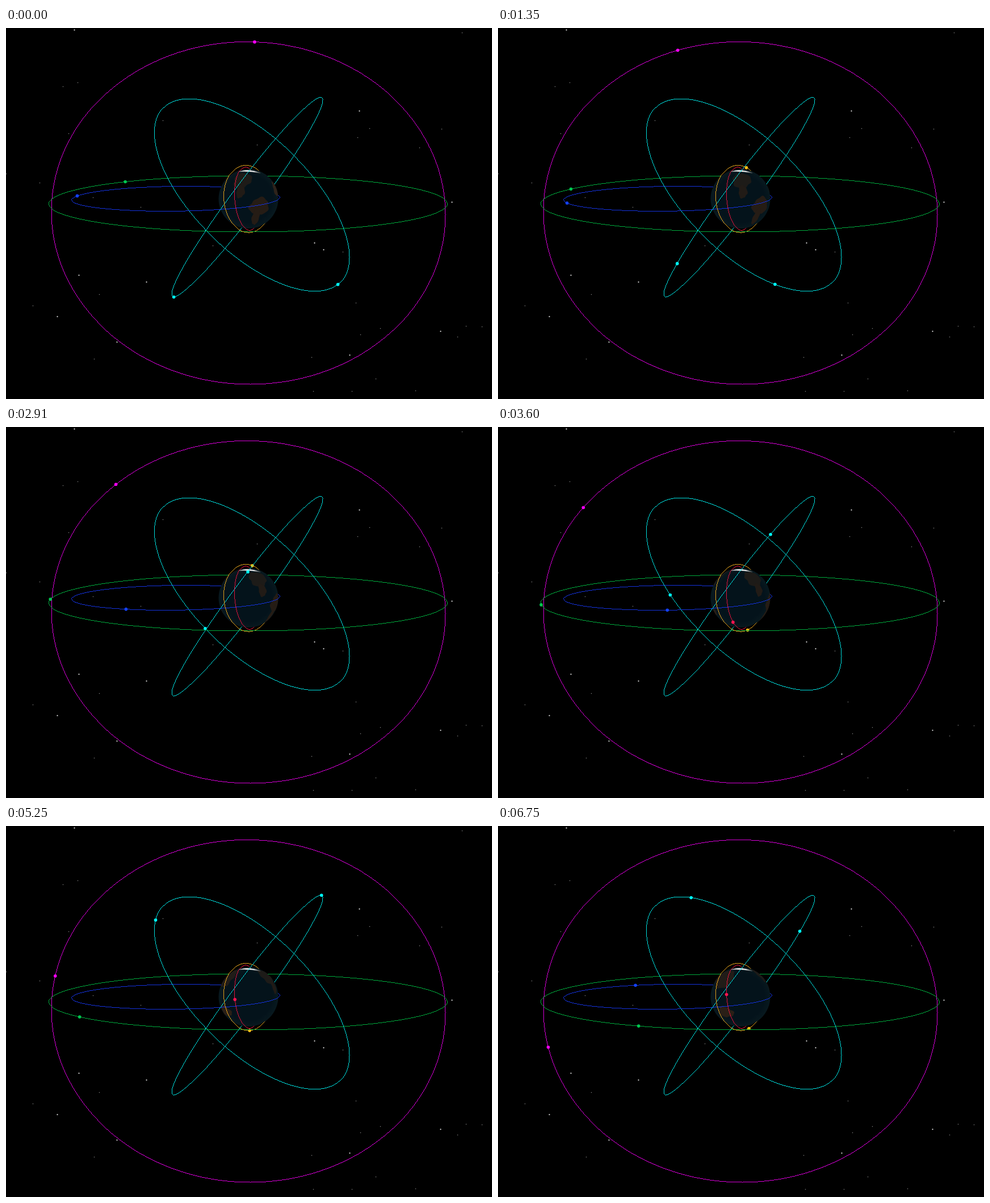
Animation, 856 px wide and 655 px high, one loop 6780 ms. Source, as an HTML page:

```html
<!DOCTYPE html>
<html lang="en">
<head>
<meta charset="utf-8">
<title>Satellite orbits</title>
<style>
  html, body { margin: 0; width: 100%; height: 100%; overflow: hidden; background: #000; }
  svg { display: block; width: 856px; height: 655px; }
  .line { fill: none; stroke-width: 1; shape-rendering: crispEdges; }
</style>
</head>
<body>
<svg id="stage" viewBox="0 0 856 655">
  <defs>
    <radialGradient id="sea">
      <stop offset="0.8" stop-color="#04131b"/>
      <stop offset="1" stop-color="#08191f"/>
    </radialGradient>
    <linearGradient id="ice">
      <stop offset="0" stop-color="#999"/>
      <stop offset="0.3" stop-color="#fff"/>
      <stop offset="0.7" stop-color="#eee"/>
      <stop offset="1" stop-color="#555"/>
    </linearGradient>
  </defs>
  <rect width="856" height="655"/>
  <g id="stars"></g>
  <g id="back"></g>
  <g id="earth"></g>
  <g id="front"></g>
</svg>
<script>
const LOOP = 6780, STEP = 30, RAD = Math.PI / 180;
const EARTH = { x: 427, y: 301.5, r: 52.5, tilt: 8 * RAD, lon: -82, spin: -0.0163 };

// Projected ellipse: x = cx + rx cos(a), y = cy - ry sin(a + skew), in degrees.
// The near half starts at angle `near`. Satellites move by `rate` degrees per ms;
// `pull` is the perspective speed-up on the near side.
const ORBITS = [
  { cx: 427, cy: 326.7, rx: 347, ry: 302.3, skew: -0.5, near: 180,
    start: 88.1, rate: 0.01595, pull: 3.2, line: '#d800d8', dot: '#ff00ff' },
  { cx: 426.2, cy: 310.5, rx: 351, ry: 49.5, skew: 0, near: 180,
    start: 133.9, rate: 0.0162, pull: 8.5, line: '#00a83c', dot: '#00c850' },
  { cx: 299, cy: 301.4, rx: 183.3, ry: 22, skew: 5.6, near: 180,
    start: 167.8, rate: 0.0405, pull: 6, ecc: 0.67, perigee: -5.6, line: '#1432dc', dot: '#1442ff' },
  { cx: 433.2, cy: 294.8, rx: 171.8, ry: 169.8, skew: -40.3, near: -40,
    start: -23.8, rate: -0.03225, pull: 4.6, line: '#00dcdc', dot: '#00ffff' },
  { cx: 425, cy: 298.5, rx: 133, ry: 176.5, skew: 76.4, near: 50,
    start: 190.3, rate: -0.0336, pull: 4, line: '#00dcdc', dot: '#00ffff' },
  { cx: 425, cy: 301.8, rx: 41.5, ry: 59.3, skew: -4, near: 90,
    start: 384.5, rate: -0.2274, pull: 5, line: '#e0a01c', dot: '#ffc014' },
  { cx: 425.5, cy: 301.5, rx: 23, ry: 55.7, skew: -9, near: 90,
    start: 405.4, rate: -0.246, pull: 0, line: '#dc143c', dot: '#ff1450' }
];

// Blobs of land: centre longitude and latitude, half width, half height.
const LANDS = [
  { lon: -100, lat: 49, w: 28, h: 19, fill: '#1d1b18' },
  { lon: -99, lat: 22, w: 9, h: 13, fill: '#211b16' },
  { lon: -59, lat: -8, w: 21, h: 17, fill: '#251c15' },
  { lon: -65, lat: -33, w: 9, h: 21, fill: '#251c15' },
  { lon: -3, lat: 21, w: 14, h: 15, fill: '#2e231b' },
  { lon: 134, lat: -25, w: 19, h: 12, fill: '#2a1f17' },
  { lon: 112, lat: 45, w: 38, h: 22, fill: '#211c18' }
];

const BRIGHT_STARS = [[120, 3], [622, 146], [785, 307], [543, 379], [559, 391], [128, 436],
  [247, 448], [90, 509], [195, 554], [605, 577], [765, 535]];
const FAINT_COUNT = 30;

const $ = id => document.getElementById(id);

function add(parent, tag, attrs) {
  const node = document.createElementNS('http://www.w3.org/2000/svg', tag);
  for (const key in attrs) node.setAttribute(key, attrs[key]);
  parent.appendChild(node);
  return node;
}

function randomizer(seed) {
  return () => (seed = (seed * 16807) % 2147483647) / 2147483647;
}

function pointOn(o, deg) {
  return [o.cx + o.rx * Math.cos(deg * RAD), o.cy - o.ry * Math.sin((deg + o.skew) * RAD)];
}

// Thin stair-stepped line for half an orbit: one pixel per step, no doubled corners.
function halfPath(o, start) {
  const cells = [];
  for (let a = 0; a <= 180; a += 0.1) {
    const [x, y] = pointOn(o, start + a).map(Math.floor);
    const last = cells.at(-1), before = cells.at(-2);
    if (last && last[0] === x && last[1] === y) continue;
    if (before && Math.abs(before[0] - x) === 1 && Math.abs(before[1] - y) === 1) cells.pop();
    cells.push([x, y]);
  }
  return cells.map(([x, y]) => `M${x} ${y + 0.5}h1`).join('');
}

// Kepler's equation: mean to eccentric anomaly, in degrees.
function eccentric(mean, e) {
  const m = mean * RAD;
  let a = m + e * Math.sin(m);
  for (let i = 0; i < 8; i++) a -= (a - e * Math.sin(a) - m) / (1 - e * Math.cos(a));
  return a / RAD;
}

function angleAt(o, t) {
  const mean = o.start + o.rate * t;
  const angle = o.ecc ? eccentric(mean, o.ecc) + o.perigee : mean;
  return angle + o.pull * Math.sin((angle - o.near - 90) * RAD);
}

// Orthographic view of the globe; points past the horizon slide to the limb.
function project(lon, lat, centre) {
  const d = (lon - centre) * RAD, p = lat * RAD;
  const sin = Math.sin(EARTH.tilt), cos = Math.cos(EARTH.tilt);
  const x = Math.cos(p) * Math.sin(d);
  const y = Math.sin(p) * cos - Math.cos(p) * sin * Math.cos(d);
  const z = Math.sin(p) * sin + Math.cos(p) * cos * Math.cos(d);
  const k = EARTH.r / (z < 0 ? Math.hypot(x, y) || 1 : 1);
  return [EARTH.x + k * x, EARTH.y - k * y];
}

function landPath(land, centre) {
  const pts = [];
  for (let a = 0; a < 360; a += 8) {
    const rough = 1 + 0.1 * Math.sin(3 * a * RAD + land.lon) + 0.06 * Math.sin(7 * a * RAD + land.lat);
    const [x, y] = project(land.lon + land.w * rough * Math.cos(a * RAD),
      land.lat + land.h * rough * Math.sin(a * RAD), centre);
    pts.push(x.toFixed(2) + ' ' + y.toFixed(2));
  }
  return 'M' + pts.join('L') + 'Z';
}

function addStar(x, y, r, fill) {
  add($('stars'), 'circle', { cx: x + 0.5, cy: y + 0.5, r, fill });
}

const random = randomizer(41);
for (let i = 0; i < FAINT_COUNT; i++)
  addStar(Math.floor(random() * 856), Math.floor(random() * 655), 0.75, '#888');
for (const [x, y] of BRIGHT_STARS) addStar(x, y, 1.1, '#eee');

add($('earth'), 'circle', { cx: EARTH.x, cy: EARTH.y, r: EARTH.r, fill: 'url(#sea)' });
for (const land of LANDS) land.node = add($('earth'), 'path', { fill: land.fill });
add($('earth'), 'path', { d: 'M411 253.5Q427 248 448 256Q428 252 411 253.5Z', fill: 'url(#ice)',
  stroke: 'url(#ice)', 'stroke-width': 0.6 });

for (const o of ORBITS) {
  add($('back'), 'path', { class: 'line', stroke: o.line, d: halfPath(o, o.near + 180) });
  add($('front'), 'path', { class: 'line', stroke: o.line, d: halfPath(o, o.near) });
}
for (const o of ORBITS) o.node = add($('front'), 'circle', { r: 2.8, fill: o.dot });

function draw(t) {
  const centre = EARTH.lon + EARTH.spin * t;
  for (const land of LANDS) land.node.setAttribute('d', landPath(land, centre));
  for (const o of ORBITS) {
    const angle = angleAt(o, t);
    const [x, y] = pointOn(o, angle);
    o.node.setAttribute('cx', x.toFixed(2));
    o.node.setAttribute('cy', y.toFixed(2));
    const isNear = ((angle - o.near) % 360 + 360) % 360 < 180;
    const layer = $(isNear ? 'front' : 'back');
    if (o.node.parentNode !== layer) layer.appendChild(o.node);
  }
}

let start;
function tick(now) {
  start ??= now;
  draw(Math.floor(((now - start) % LOOP) / STEP) * STEP);
  requestAnimationFrame(tick);
}
draw(0);
requestAnimationFrame(tick);
</script>
</body>
</html>
```
